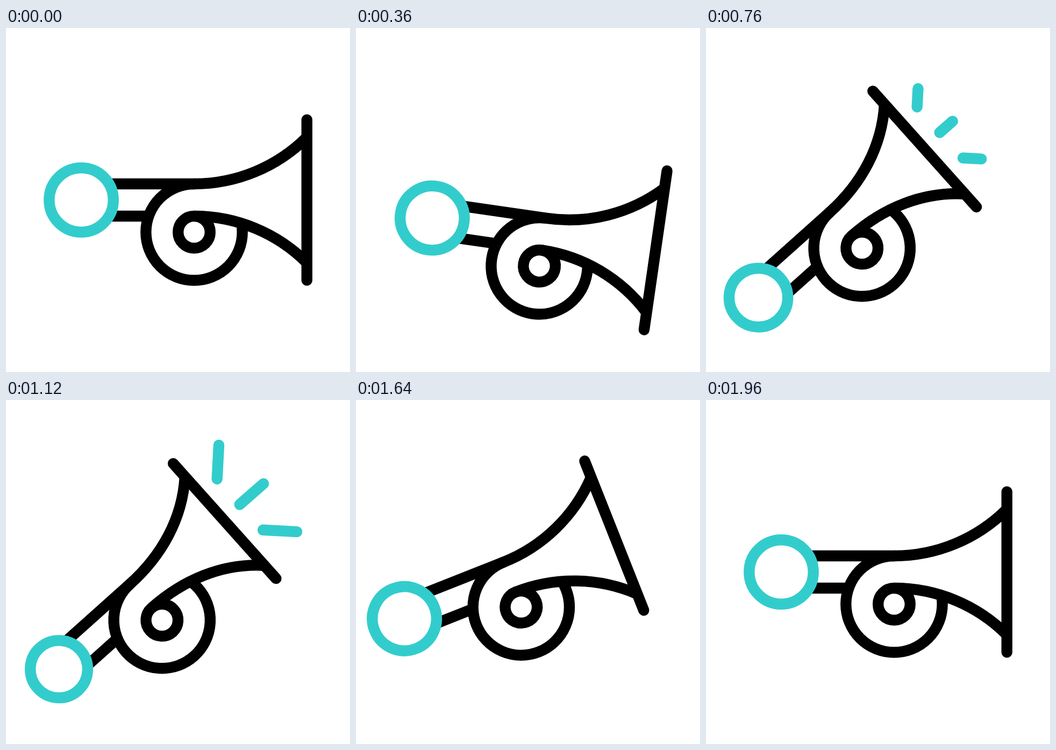
An HTML page with a canvas that plays this animation: 640x640 px, repeating every 2 s.

```html
<!DOCTYPE html>
<html lang="en">
<head>
<meta charset="utf-8">
<title>Horn</title>
<style>
html, body { margin: 0; width: 100%; height: 100%; overflow: hidden; background: #fff; }
canvas { display: block; width: 640px; height: 640px; }
</style>
</head>
<body>
<canvas id="stage" width="640" height="640"></canvas>
<script>
const ctx = document.getElementById('stage').getContext('2d');
const LOOP = 2000, STEP = 40, RAD = Math.PI / 180;
const BLACK = '#000', TEAL = '#33cccc';
const TILT = -41.8, DIP = 10;

// Paths of the horn's middle, relative to the stage centre
const DIP_PATH = [[0, 0], [0, 66]];
const HOP_PATH = [[0, 66], [1.9, 20.3], [-36.3, -90.9], [-123.6, 28.7], [-92, 65]];
const BACK_PATH = [[-92, 65], [-84, 75], [-48, -48], [0, 0]];

// Sound rays: start x, start y, direction in degrees, full length
const RAYS = [
  [392.7, 147, -87, 97.5],
  [434.7, 194.5, -41.2, 91],
  [478, 241.8, 3, 97.5]
];

const mix = (a, b, e) => a + (b - a) * e;

function ease(t, from, to) {
  const u = Math.min(1, Math.max(0, (t - from) / (to - from)));
  return u * u * (3 - 2 * u);
}

function bezier(pts, e) {
  while (pts.length > 1) {
    pts = pts.slice(1).map((p, i) => [mix(pts[i][0], p[0], e), mix(pts[i][1], p[1], e)]);
  }
  return pts[0];
}

function pose(t) {
  let e;
  if (t < 320) {
    e = ease(t, 80, 320);
    return { pos: bezier(DIP_PATH, e), angle: mix(0, DIP, e) };
  }
  if (t < 1000) {
    e = ease(t, 320, 680);
    return { pos: bezier(HOP_PATH, e), angle: mix(DIP, TILT, e) };
  }
  e = ease(t, 1332, 1962);
  return { pos: bezier(BACK_PATH, e), angle: mix(TILT, 0, e) };
}

// Two beats: up, down, up, down between five times
function beats(t, [a, b, c, d, e]) {
  return ease(t, a, b) - ease(t, b, c) + ease(t, c, d) - ease(t, d, e);
}

function stroke(color, cap, trace) {
  ctx.strokeStyle = color;
  ctx.lineCap = cap;
  ctx.beginPath();
  trace();
  ctx.stroke();
}

function line(x1, y1, x2, y2) {
  ctx.moveTo(x1, y1);
  ctx.lineTo(x2, y2);
}

// One flank of the bell; side is -1 above the axis, 1 below
function flank(side, pinch) {
  const y = off => 320 + side * off;
  ctx.moveTo(350, y(30));
  ctx.bezierCurveTo(428.8, y(30), 504.3, y(61.3 - pinch), 560, y(117 - pinch));
}

function drawHorn(squeeze) {
  const pinch = 10.7 * squeeze;
  const dent = 11.4 * squeeze;
  stroke(BLACK, 'butt', () => {
    line(193, 290, 352, 290);
    line(193, 350, 264, 350);
  });
  stroke(BLACK, 'butt', () => flank(-1, pinch));
  stroke(BLACK, 'butt', () => flank(1, pinch));
  stroke(BLACK, 'butt', () => ctx.arc(350, 379.8, 89.7, -90 * RAD, -9 * RAD, true));
  stroke(BLACK, 'butt', () => ctx.arc(350, 379.8, 29.8, 0, 360 * RAD));

  const half = 149.4 - pinch;
  stroke(BLACK, 'round', () => line(559.8, 320 - half, 559.8, 320 + half));
  stroke(TEAL, 'butt', () => ctx.arc(140 + dent, 320, 59.7 - dent, 0, 360 * RAD));
}

function drawRays(grow) {
  if (grow < 0.005) return;
  for (const [x, y, deg, full] of RAYS) {
    const len = full * grow;
    stroke(TEAL, 'round', () =>
      line(x, y, x + len * Math.cos(deg * RAD), y + len * Math.sin(deg * RAD)));
  }
}

function draw(t) {
  const { pos, angle } = pose(t);
  ctx.fillStyle = '#fff';
  ctx.fillRect(0, 0, 640, 640);
  ctx.lineWidth = 20.4;
  ctx.save();
  ctx.translate(320 + pos[0], 320 + pos[1]);
  ctx.rotate(angle * RAD);
  ctx.translate(-320, -320);
  drawHorn(beats(t, [680, 853, 1027, 1200, 1330]));
  ctx.restore();
  drawRays(beats(t, [680, 880, 1000, 1200, 1330]));
}

const start = performance.now();
function tick() {
  const t = (performance.now() - start) % LOOP;
  draw(Math.floor(t / STEP) * STEP);
  requestAnimationFrame(tick);
}
tick();
</script>
</body>
</html>
```
